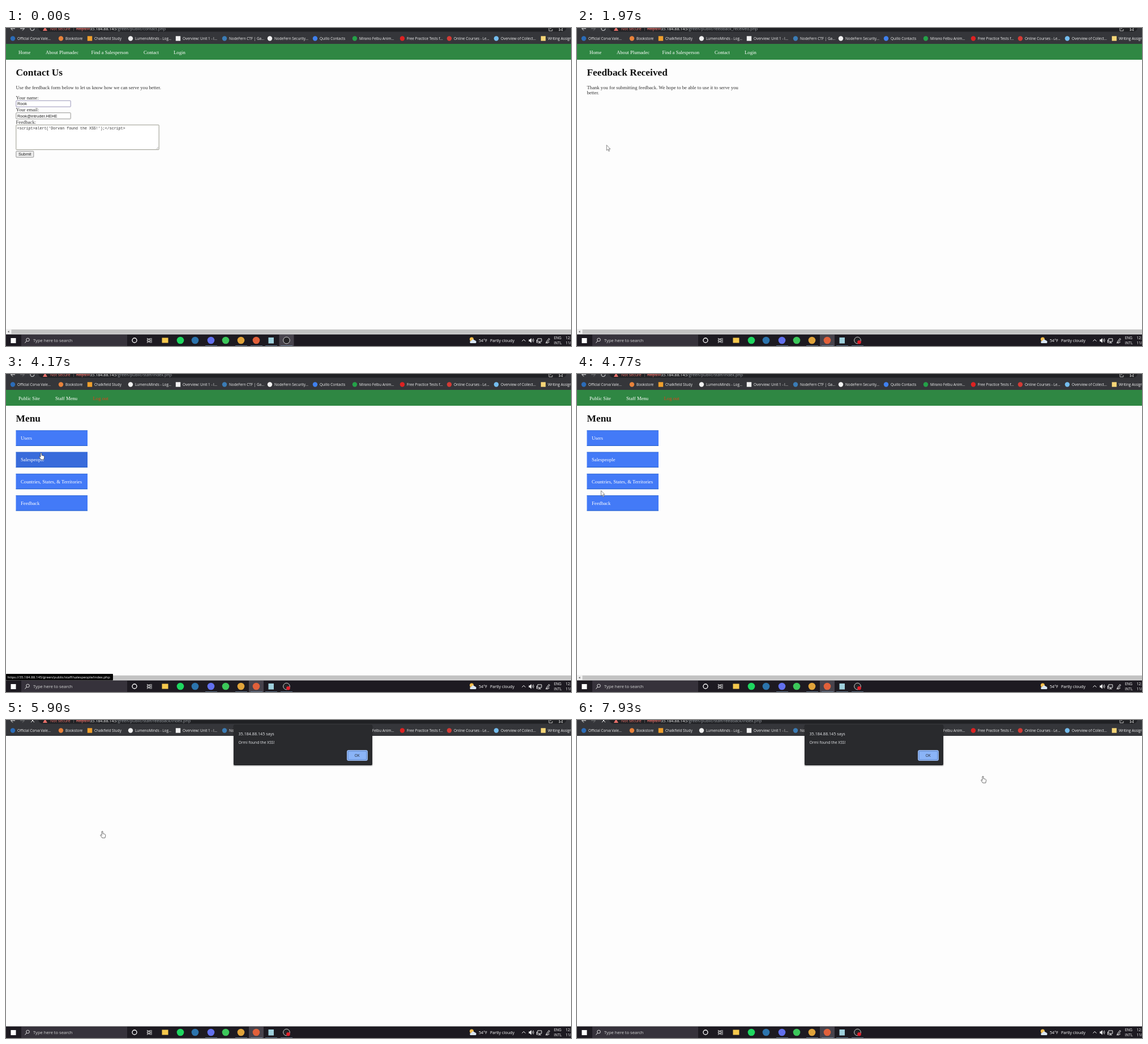
An HTML page that plays this animation: 998 by 561 pixels, repeating every 8000 ms.

```html
<!DOCTYPE html>
<html lang="en">
<head>
<meta charset="utf-8">
<title>Feedback form demo</title>
<style>
  html, body { margin: 0; width: 100%; height: 100%; overflow: hidden; background: #fdfdfd; }
  svg { display: block; width: 100%; height: 100%; }
  text { white-space: pre; }
  .ui { font-family: "Open Sans", "Noto Sans", sans-serif; }
  .page { font-family: "Liberation Serif", "Times New Roman", serif; font-size: 8.7px; }
  .field { font-family: "Liberation Sans", Arial, sans-serif; font-size: 7.25px; }
  .code { font-family: "Liberation Mono", monospace; font-size: 6.64px; }
  h1, .title { font-size: 17.4px; font-weight: bold; }
</style>
</head>
<body>
<svg viewBox="0 0 998 561" xmlns="http://www.w3.org/2000/svg">
  <rect width="998" height="561" fill="#fdfdfd"/>
  <g id="content" class="page"></g>
  <g id="chrome" class="ui"></g>
  <g id="taskbar" class="ui"></g>
  <g id="overlay" class="ui"></g>
  <g id="cursor" stroke-linejoin="round">
    <path id="arrow" d="M0 0V9.5L2.2 7.5 3.8 11 5.2 10.4 3.7 7H6.6Z" fill="#fff" stroke="#555" stroke-width=".7"/>
    <path id="hand" d="M-1 .8Q0-.6 1 .8V4.5L4.6 5.4Q6 6 5.7 7.6L4.8 12H-.2L-3.2 7.6Q-3.2 6.2-2 6.6L-1 7.6Z"
      fill="#fff" stroke="#333" stroke-width=".7"/>
  </g>
</svg>
<script>
const LOOP = 8000;
const SUBMIT = 1650, LOGIN = 3400, OPEN = 5600, ALERT = 5780;
const HOST = '35.184.88.145';
const ROOT = '/green/public/';
const $ = id => document.getElementById(id);

const text = (x, y, str, fill = '#fff', attrs = '') =>
  `<text x="${x}" y="${y}" fill="${fill}" ${attrs}>${str}</text>`;
const rect = (x, y, w, h, fill, attrs = '') =>
  `<rect x="${x}" y="${y}" width="${w}" height="${h}" fill="${fill}" ${attrs}/>`;
const dot = (x, y, r, fill, attrs = '') =>
  `<circle cx="${x}" cy="${y}" r="${r}" fill="${fill}" ${attrs}/>`;
const line = (d, stroke, width = 1) =>
  `<path d="${d}" fill="none" stroke="${stroke}" stroke-width="${width}"/>`;
const size = px => `font-size="${px}"`;

// Bookmarks: icon x, icon colour, square icon?, label
const bookmarks = [
  [12, '#2b6cb8', 0, 'Official Corva Vale...'],
  [97, '#e8823a', 0, 'Bookstore'],
  [148, '#f0a02c', 1, 'Chalkfield Study'],
  [220, '#f2f2f2', 0, 'LumenoMinds - Log...'],
  [304, '#f2f2f2', 1, 'Overview: Unit 1 - I...'],
  [386, '#3b7cb5', 0, 'NodeFern CTF | Ga...'],
  [466, '#f2f2f2', 0, 'NodeFern Security...'],
  [546, '#3f80ee', 0, 'Quillo Contacts'],
  [616, '#24a148', 0, 'Mirano Felbu Anim...'],
  [700, '#dd2222', 0, 'Free Practice Tests f...'],
  [783, '#d23b35', 0, 'Online Courses - Le...'],
  [866, '#74bdee', 0, 'Overview of Collect...'],
  [949, '#f6d577', 1, 'Writing Assignments']
];

function browserBar(path, canForward, loading) {
  const reload = loading
    ? line('M44-2L50 4M50-2L44 4', '#eee')
    : line('M50 1A3.5 3.5 0 1 1 47-2.5', '#eee');
  const marks = bookmarks.map(([x, color, square, label]) =>
    (square ? rect(x - 4.2, 14.3, 8.4, 8.4, color) : dot(x, 18.5, 4.2, color)) +
    text(x + 8, 20.8, label, '#f1f1f1', size(6.4))).join('');
  return rect(0, 0, 998, 28, '#35363a') +
    rect(57, -10, 933, 16.5, '#202124', 'rx="8"') +
    line('M16 1H9M12-2.5L8.5 1L12 4.5', '#eee') +
    line('M25 1H32M29-2.5L32.5 1L29 4.5', canForward ? '#eee' : '#77787b') + reload +
    `<path d="M65 5L69-2L73 5Z" fill="#e8706a"/>` +
    text(78, 4, 'Not secure', '#e8706a', size(7.1)) +
    line('M119.5-3V5', '#666', .8) +
    text(124, 4, 'https://', '#e8706a', size(7.2) + ' text-decoration="line-through"') +
    text(148, 4, `${HOST}<tspan fill="#9aa0a6">${ROOT + path}</tspan>`, '#f1f1f1', size(7.2)) +
    line('M959 0V5H965V2M961 2Q962-1 966-1', '#ccc', .9) +
    line('M977 5L978 1L975-1.5H985L982 1L983 5L980 3Z', '#ccc', .9) + marks;
}

function taskbar(recording, browserActive) {
  const running = [362, 415, 442, 468, 495];
  const apps = [
    [308, '#1ed760'], [334, '#2c74ad'], [362, '#6270ee'],
    [388, '#3cc75a'], [415, '#e0a33a'], [442, '#e2603a']
  ];
  return rect(0, 540.5, 998, 21, '#1d1a21') +
    rect(browserActive ? 429 : 482.5, 541, 26, 20, '#47434c') +
    rect(27, 541, 187, 20, '#36323b') +
    rect(8.5, 547, 9, 9, '#fff') +
    dot(38.5, 550, 2.8, 'none', 'stroke="#eee" stroke-width=".9"') + line('M36.5 552L33.5 555.5', '#eee') +
    text(48, 554.2, 'Type here to search', '#d8d8d8', size(7.6)) +
    dot(227, 551, 4, 'none', 'stroke="#fff" stroke-width="1.3"') +
    line('M249.5 547V548.5H255V547M249.5 555.5V554H255V555.5M249.5 550H255V552.5H249.5ZM257 547V555.5', '#e8e8e8', .9) +
    rect(275.5, 546.5, 11, 9, '#f5c84c') +
    apps.map(([x, color]) => dot(x, 551, 6.3, color)).join('') +
    rect(463.5, 546, 9.5, 10.5, '#9fd0dc') +
    dot(495.5, 551, 5.8, '#252427', 'stroke="#cfcfcf"') +
    (recording ? dot(498.5, 554.3, 3.3, '#e3202b') : '') +
    running.map(x => rect(x - 10, 560, 21, 1, '#7898b4', 'opacity=".7"')).join('') +
    dot(822.5, 549, 3.5, '#f3bd4d') +
    `<path d="M820 556Q818 552 822 552Q824 547 828 551Q832 552 830 556Z" fill="#d9e6f2"/>` +
    text(835, 554, '54°F', '#fff', size(7.2)) + text(855, 554, 'Partly cloudy', '#fff', size(7.2)) +
    line('M911.5 552.5L914.5 549.5L917.5 552.5', '#fff') +
    `<path d="M923.5 549.5H925.5L928 547V555.5L925.5 553H923.5Z" fill="#fff"/>` +
    line('M929.5 549Q931 551 929.5 553M931 547.5Q933.5 551 931 554.5', '#fff', .8) +
    line('M939 548H946V553H939ZM940 555.5H945M942.5 553V555.5M937.5 550V555H939.5', '#fff', .9) +
    line('M954 554L959 547.5L960.5 549L955.5 555ZM953 555.5Q957 557 960 553.5', '#fff', .9) +
    text(968, 549.2, 'ENG', '#fff', size(6.4)) + text(968, 558.2, 'INTL', '#fff', size(6.4)) +
    text(988.5, 549.2, '12:22', '#fff', size(6.4)) + text(988.5, 558.2, '11/12', '#fff', size(6.4));
}

const navBar = items => rect(0, 28, 998, 28, '#2f8743') +
  items.map(([x, label, color]) => text(x, 45.8, label, color)).join('');
const publicNav = navBar([[22, 'Home'], [70, 'About Plumadec'], [150.5, 'Find a Salesperson'],
  [243, 'Contact'], [296, 'Login']]);
const staffNav = navBar([[22, 'Public Site'], [87, 'Staff Menu'], [153.5, 'Log out', '#e0401c']]);

const title = str => text(17.5, 83.6, str, '#111', 'class="title"');
const scrollBar = rect(0, 531, 998, 9.5, '#f0f0f0') + rect(9.5, 532, 989, 7.5, '#c3c3c3') +
  `<path d="M3 535.7L5.5 533.7V537.7Z" fill="#666"/>`;
const box = (y, w, h, stroke) => rect(17.8, y, w, h, '#fff', `stroke="${stroke}" stroke-width=".8" rx=".8"`);
const body = (y, str) => text(17.5, y, str, '#333');

const contactPage = publicNav + title('Contact Us') +
  body(107.5, 'Use the feedback form below to let us know how we can serve you better.') +
  body(126, 'Your name:') + box(128.2, 96.4, 10.8, '#7f7aa6') +
  text(20, 136.3, 'Rook', '#222', 'class="field"') +
  body(147.3, 'Your email:') + box(149.6, 96.4, 10.8, '#7c7c78') +
  text(20, 157.6, 'Rook@intruder.HEHE', '#222', 'class="field"') +
  body(168.6, 'Feedback:') + box(171, 252.4, 43.6, '#7f7f70') +
  text(19.7, 179.2, "&lt;script>alert('Dorvan found the XSS!');&lt;/script>", '#333', 'class="code"') +
  line('M265.5 213.5L269 210M267.5 213.5L269 212', '#888', .6) +
  rect(17.8, 217.3, 31, 10.8, '#efefef', 'stroke="#7a7a7a" stroke-width=".8" rx="1"') +
  text(33.3, 225.3, 'Submit', '#222', 'class="field" text-anchor="middle"') + scrollBar;

const thanksPage = publicNav + title('Feedback Received') +
  body(107.5, 'Thank you for submitting feedback. We hope to be able to use it to serve you') +
  body(117.2, 'better.') + scrollBar;

const menu = [
  ['Users', 'users'], ['Salespeople', 'salespeople'],
  ['Countries, States, &amp; Territories', 'countries'], ['Feedback', 'feedback']
];
const menuTop = i => 99.5 + i * 38.2;
const menuPage = hover => staffNav + title('Menu') + menu.map(([label], i) => {
  const y = menuTop(i);
  return rect(17.5, y, 126.5, 27.3, i === hover ? '#386bdb' : '#437af7') +
    rect(17.5, y, 126.5, .8, '#2f67cf') + rect(17.5, y + 26.4, 126.5, .9, '#1f5cc4') +
    text(26, y + 16.6, label);
}).join('') + scrollBar;

function statusBubble(folder) {
  const url = `https://${HOST}${ROOT}staff/${folder}/index.php`;
  const width = 189 - (11 - folder.length) * 2.7;
  return rect(0, 529, width, 11.5, '#050505', 'rx="1"') + text(2.5, 537, url, '#fff', size(6.15));
}

const dialog = rect(401, 9, 247, 73, '#000', 'opacity=".15" rx="3"') +
  rect(402, 8, 245, 72, '#292a2d', 'rx="2"') +
  text(410.5, 26.8, `${HOST} says`, '#e8eaed', size(7.2)) +
  text(410.5, 42.3, 'Ormi found the XSS!', '#e8eaed', size(6.8)) +
  rect(602.6, 53.6, 35.8, 17.8, '#8ab4f8', 'rx="2" stroke="#a9c8fb"') +
  rect(604, 55, 33, 15, 'none', 'rx="1" stroke="#5379b5" stroke-width=".8"') +
  text(620.3, 64.8, 'OK', '#202124', size(6.4) + ' text-anchor="middle"');

// Pointer path: time, x, y
const path = [
  [780, -14, 200], [900, 10, 208], [1250, 30, 221], [1750, 30, 221], [3000, 300, 46],
  [3450, 300, 46], [4100, 62, 139], [4300, 62, 139], [5000, 36, 228], [5650, 36, 228],
  [6450, 610, 91], [6680, 610, 91], [7700, 717, 99]
];
function pointer(t) {
  const next = path.findIndex(p => p[0] > t);
  if (next === 0) return path[0].slice(1);
  if (next < 0) return path[path.length - 1].slice(1);
  const [t0, x0, y0] = path[next - 1], [t1, x1, y1] = path[next];
  const u = (t - t0) / (t1 - t0), k = u * u * (3 - 2 * u);
  return [x0 + (x1 - x0) * k, y0 + (y1 - y0) * k];
}

const drawn = {};
function show(id, key, build) {
  if (drawn[id] === key) return;
  drawn[id] = key;
  $(id).innerHTML = build();
}

function render(t) {
  const [x, y] = pointer(t);
  const stage = [SUBMIT, LOGIN, OPEN].filter(start => t >= start).length;
  const hover = stage === 2 && x > 17 && x < 144
    ? menu.findIndex((_, i) => y >= menuTop(i) - 1.5 && y <= menuTop(i) + 27.3) : -1;
  const overNav = stage === 1 && y > 36 && y < 52 && x > 294 && x < 320;
  const isHand = hover >= 0 || overNav || stage === 3;
  const urls = ['contact.php', 'feedback_received.php', 'staff/index.php', 'staff/feedback/index.php'];
  const pages = [() => contactPage, () => thanksPage, () => menuPage(hover), () => ''];
  const recording = t >= 450, browserActive = t >= SUBMIT - 120, alerting = t >= ALERT;

  show('content', `${stage}/${hover}`, pages[stage]);
  show('chrome', stage, () => browserBar(urls[stage], stage === 0, stage === 3));
  show('taskbar', `${recording}/${browserActive}`, () => taskbar(recording, browserActive));
  show('overlay', `${hover}/${alerting}`, () =>
    alerting ? dialog : hover >= 0 ? statusBubble(menu[hover][1]) : '');
  $('cursor').setAttribute('transform', `translate(${x.toFixed(1)} ${y.toFixed(1)})`);
  $('arrow').style.display = isHand ? 'none' : '';
  $('hand').style.display = isHand ? '' : 'none';
}

const start = performance.now();
function tick() {
  render((performance.now() - start) % LOOP);
  requestAnimationFrame(tick);
}
tick();
</script>
</body>
</html>
```
